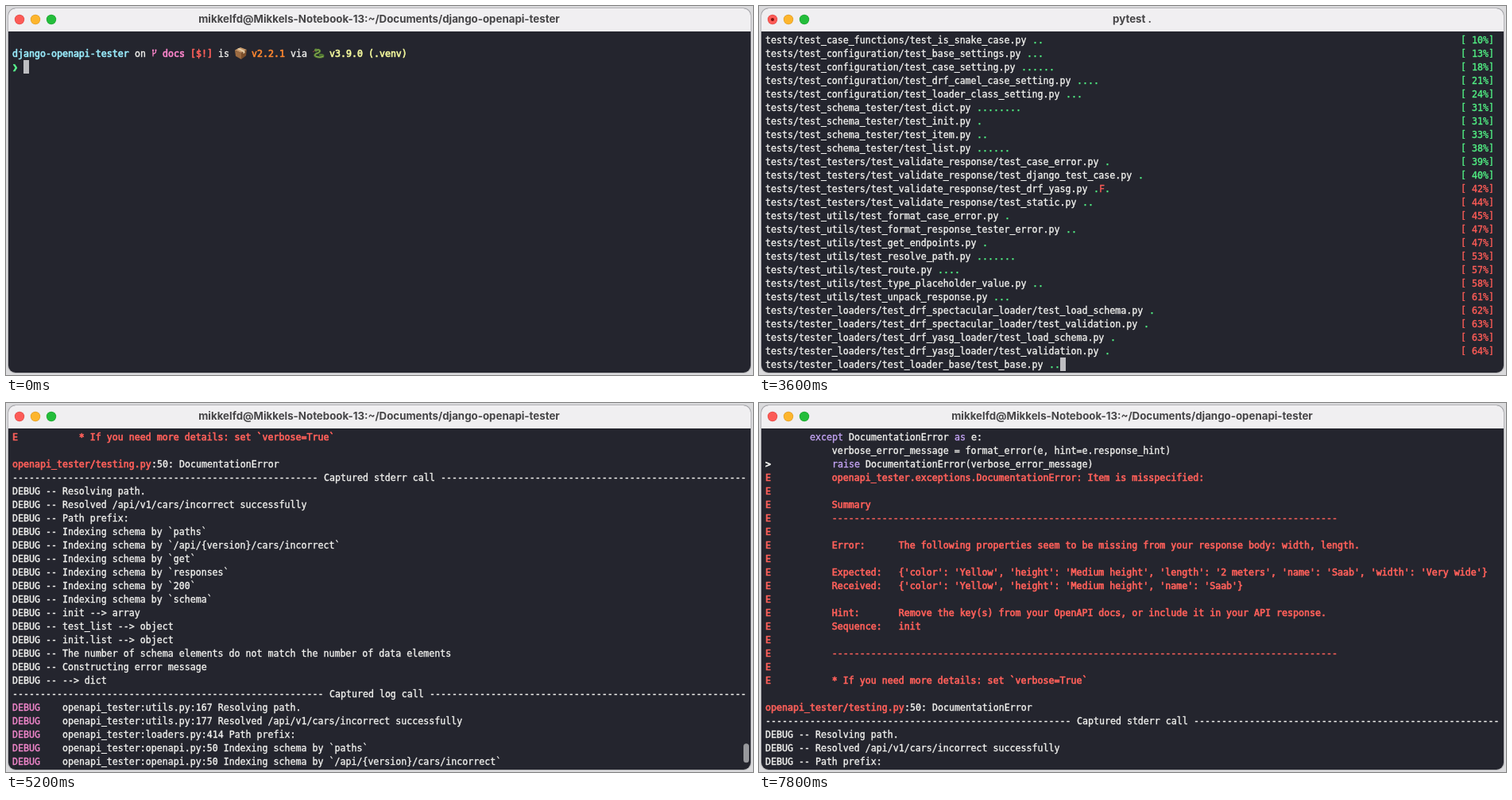
Write an HTML page with a canvas that moves like this. It is 940x464 px and loops after 8000 ms.

```html
<!DOCTYPE html>
<html lang="en">
<head>
<meta charset="utf-8">
<title>Terminal</title>
<style>
html, body { margin: 0; width: 100%; height: 100%; overflow: hidden; background: #dadadc; }
canvas { display: block; }
</style>
</head>
<body>
<canvas id="stage" width="940" height="464"></canvas>
<script>
const ctx = document.getElementById('stage').getContext('2d');
const LOOP = 8000, STEP = 200;
const COLS = 132, ROWS = 25, CW = 7, RH = 17, LEFT = 8, TOP = 34;
const MONO = '11.627px "DejaVu Sans Mono", monospace';
const SHELL_TITLE = 'mikkelfd@Mikkels-Notebook-13:~/Documents/django-openapi-tester';

// Style key: [colour, bold]. Lines switch style with "§" and a key.
const STYLES = {
  w: ['#f1f1ee', 0], W: ['#f4f4f1', 1], u: ['#f1f1ee', 0],
  g: ['#52f285', 0], G: ['#5af78e', 1], r: ['#ff5c57', 0], R: ['#ff605a', 1],
  c: ['#9aedfe', 1], m: ['#ff86cd', 1], o: ['#ff8730', 1], y: ['#f4f99d', 1],
  p: ['#c3a3f3', 0], d: ['#f086ca', 0]
};

function parse(line) {
  let col = 0;
  return ('w' + line).split('§').filter(s => s.length > 1).map(s => {
    const part = { key: s[0], text: s.slice(1), col };
    col += part.text.length;
    return part;
  });
}
const width = line => parse(line).reduce((n, p) => n + p.text.length, 0);

function rule(title, ch, key, plain = title.length) {
  const n = Math.floor((COLS - plain - 2) / 2);
  const extra = n * 2 + plain + 2 < COLS ? 1 : 0;
  return `§${key}${ch.repeat(n)}§${key} ${title} §${key}${ch.repeat(n + extra)}`;
}

const PROMPT = '§cdjango-openapi-tester§w on   §mdocs §R[$!]§w is    §ov2.2.1§w via    §yv3.9.0 (.venv)';

const SESSION = [
  rule('test session starts', '=', 'W'),
  'platform darwin -- Python 3.9.0, pytest-6.2.1, py-1.10.0, pluggy-0.13.1',
  'django: settings: demo.settings (from ini)',
  'rootdir: /Users/mikkelfd/Documents/django-openapi-tester, configfile: pytest.ini',
  'plugins: cov-2.10.1, django-4.1.0'
];

// Folder: file and number of tests in it.
const SUITES = {
  '': 'exceptions:2 openapi:2',
  'test_case_functions/': 'ignore_case:1 is_camel_case:2 is_kebab_case:2 is_pascal_case:2 is_snake_case:2',
  'test_configuration/': 'base_settings:3 case_setting:6 drf_camel_case_setting:4 loader_class_setting:3',
  'test_schema_tester/': 'dict:8 init:1 item:2 list:6',
  'test_testers/test_validate_response/': 'case_error:1 django_test_case:1 drf_yasg:3 static:2',
  'test_utils/': 'format_case_error:1 format_response_tester_error:2 get_endpoints:1 resolve_path:7 ' +
    'route:4 type_placeholder_value:2 unpack_response:3',
  'tester_loaders/test_drf_spectacular_loader/': 'load_schema:1 validation:1',
  'tester_loaders/test_drf_yasg_loader/': 'load_schema:1 validation:1',
  'tester_loaders/test_loader_base/': 'base:4 create_dict_from_schema:4 ' +
    'get_request_body_schema_section:10 get_response_schema_section:6 validation_methods:4',
  'tester_loaders/test_static_schema_loader/': 'load_file:5 load_schema:4 validation:5'
};
const TOTAL = 119, FAILED = 50;

function testLines(done) {
  const out = [];
  let start = 0;
  for (const [dir, files] of Object.entries(SUITES)) {
    for (const file of files.split(' ')) {
      if (start >= done) return out;
      const [name, size] = file.split(':');
      const end = start + Number(size);
      const path = `tests/${dir}test_${name}.py `;
      let marks = '';
      for (let i = start + 1; i <= Math.min(end, done); i++) marks += i === FAILED ? '§rF' : '§g.';
      let line = path + marks;
      if (done > end || done === TOTAL) {
        const pct = String(Math.floor(end * 100 / TOTAL)).padStart(3);
        line += '§w' + ' '.repeat(COLS - 7 - width(line)) + (end < FAILED ? '§g' : '§r') + `[${pct}%]`;
      }
      out.push(line);
      start = end;
    }
  }
  return out;
}

const DASHES = '-'.repeat(91);
const ERRORS = [
  'openapi_tester.exceptions.DocumentationError: Item is misspecified:',
  '', 'Summary', DASHES, '',
  'Error:      The following properties seem to be missing from your response body: width, length.',
  '',
  "Expected:   {'color': 'Yellow', 'height': 'Medium height', 'length': '2 meters', 'name': 'Saab', 'width': 'Very wide'}",
  "Received:   {'color': 'Yellow', 'height': 'Medium height', 'name': 'Saab'}",
  '',
  'Hint:       Remove the key(s) from your OpenAPI docs, or include it in your API response.',
  'Sequence:   init',
  '', DASHES, '',
  '* If you need more details: set `verbose=True`'
];

const index = key => ['openapi.py:50', 'Indexing schema by `' + key + '`'];
const LOG = [
  ['utils.py:167', 'Resolving path.'],
  ['utils.py:177', 'Resolved /api/v1/cars/incorrect successfully'],
  ['loaders.py:414', 'Path prefix:'],
  ...['paths', '/api/{version}/cars/incorrect', 'get', 'responses', '200', 'schema'].map(index),
  ['testing.py:98', 'init --> array'],
  ['testing.py:75', 'test_list --> object'],
  ['testing.py:98', 'init.list --> object'],
  ['testing.py:64', 'The number of schema elements do not match the number of data elements'],
  ['testing.py:41', 'Constructing error message'],
  ['testing.py:45', '--> dict']
];

const REPORT = [
  '        §pexcept§w DocumentationError §pas§w e:',
  '            verbose_error_message = format_error(e, hint=e.response_hint)',
  '§W>§w           §praise§w DocumentationError(verbose_error_message)',
  ...ERRORS.map(s => '§RE           ' + s),
  '',
  '§Ropenapi_tester/testing.py§w:50: DocumentationError',
  rule('Captured stderr call', '-', 'w'),
  ...LOG.map(([, msg]) => 'DEBUG -- ' + msg),
  rule('Captured log call', '-', 'w'),
  ...LOG.map(([src, msg]) => `§dDEBUG§w    openapi_tester:${src} ${msg}`),
  rule('short test summary info', '=', 'c'),
  'FAILED tests/test_testers/test_validate_response/test_drf_yasg.py::test_incorrect - openapi_tester.exceptions.DocumentationError...',
  rule('§R1 failed§r, §g118 passed§r in 1.42s', '=', 'r', '1 failed, 118 passed in 1.42s'.length)
];

const TYPED = ['', 'p', 'pyt', 'pytes', 'pytest', 'pytest .'];
const SCROLL = [6, 16, 22, 27, 30, 32, 33, 34];

function commandLine(typed) {
  const [cmd, arg] = typed.split(' ');
  return '§G❯§w ' + (cmd ? (cmd === 'pytest' ? '§g' : '§R') + cmd : '') + (arg ? '§w §u' + arg : '');
}

function buffer(t) {
  const lines = ['', PROMPT, commandLine(TYPED[Math.min(t / STEP, 5)])];
  if (t < 1200) return lines;
  if (t < 2200) return [...lines, ''];
  lines.push(...SESSION);
  if (t < 2600) return [...lines, '§Wcollecting ... '];
  const done = Math.max(1, Math.min(TOTAL, Math.round(30 + (t - 3000) * 0.081)));
  lines.push('§Wcollected 119 items', '', ...testLines(done));
  if (t < 4200) return lines;
  lines.push('', ...REPORT, '');
  return t < 4400 ? lines : [...lines, PROMPT, '§R❯§w '];
}

function circle(x, y, r, color) {
  ctx.fillStyle = color;
  ctx.beginPath();
  ctx.arc(x, y, r, 0, Math.PI * 2);
  ctx.fill();
}

function light(x, color, rim) {
  circle(x, 17, 6.2, rim);
  circle(x, 17, 5.5, color);
}

function poly(color, ...pts) {
  ctx.fillStyle = color;
  ctx.beginPath();
  for (let i = 0; i < pts.length; i += 2) ctx.lineTo(pts[i], pts[i + 1]);
  ctx.fill();
}

function roundBox(x, y, w, h, r, color) {
  ctx.fillStyle = color;
  ctx.beginPath();
  ctx.roundRect(x, y, w, h, r);
  ctx.fill();
}

function curve(color, w, d) {
  ctx.strokeStyle = color;
  ctx.lineWidth = w;
  ctx.stroke(new Path2D(d));
}

function drawIcons(y) {
  ctx.save();
  ctx.lineCap = 'round';
  // branch
  ctx.translate(183, y);
  curve('#ff86cd', 1.2, 'M2 5V12M5.5 5V6.5Q5.5 8.3 2 9.5');
  circle(2, 4.6, 1.1, '#ff86cd');
  circle(5.5, 4.6, 1.1, '#ff86cd');
  // package
  ctx.translate(105, 0);
  poly('#c99a6b', 0, 4.5, 7, 1, 15, 4, 8, 8);
  poly('#9c6b41', 0, 4.5, 8, 8, 8, 16, 1, 12);
  poly('#7b4f2c', 15, 4, 8, 8, 8, 16, 14, 11.5);
  poly('#e6cfa9', 3, 3, 5, 2, 12.5, 5.5, 12.5, 8, 10.5, 9, 10.5, 6.7);
  // snake
  ctx.translate(98, 0);
  curve('#527a34', 2.6, 'M4 4.5Q9 3 9 6Q8 8 4 9Q1 11 4 12.5Q9 14.5 13 12.5Q14 10 9 10.5');
  curve('#9bb957', 0.9, 'M4 4.5Q9 3 9 6Q8 8 4 9Q1 11 4 12.5Q9 14.5 13 12.5');
  circle(4, 4.4, 2, '#668e3d');
  curve('#d9534a', 0.7, 'M2 5.5L0.5 6.5');
  ctx.restore();
}

// A thin outline thickens the strokes, more so for bold.
function drawText(text, x, y, color, bold) {
  ctx.fillStyle = ctx.strokeStyle = color;
  ctx.lineWidth = bold ? 0.65 : 0.35;
  ctx.fillText(text, x, y);
  ctx.strokeText(text, x, y);
}

function drawLine(line, row) {
  const y = TOP + row * RH;
  for (const { key, text, col } of parse(line)) {
    const [color, bold] = STYLES[key], x = LEFT + col * CW, w = text.length * CW;
    if (/^=+$/.test(text)) {
      ctx.fillStyle = color;
      ctx.fillRect(x, y + 7, w, 1.4);
      ctx.fillRect(x, y + 9.6, w, 1.4);
      continue;
    }
    drawText(text, x, y + 13, color, bold);
    if (key === 'u') ctx.fillRect(x, y + 15, w, 1);
  }
  if (line === PROMPT) drawIcons(y);
}

function drawWindow(running) {
  ctx.fillStyle = '#dadadc';
  ctx.fillRect(0, 0, 940, 464);
  roundBox(2, 2, 936, 460, 10, '#b4b4b7');
  roundBox(3, 3, 934, 458, 9, '#24252e');
  roundBox(3, 3, 934, 29, [9, 9, 0, 0], '#f0eff1');
  light(17, '#fc5b57', '#e2504b');
  light(37, '#fdb52d', '#e0a02c');
  light(57, '#24bd3b', '#22a835');
  if (running) circle(17, 17, 2, '#7c100e');
  ctx.fillStyle = '#464547';
  ctx.font = '700 13.3px Inter, sans-serif';
  ctx.textAlign = 'center';
  ctx.fillText(running ? 'pytest .' : SHELL_TITLE, 469.5, 21);
  ctx.textAlign = 'left';
}

function draw(t) {
  drawWindow(t >= 1200 && t < 4400);
  const lines = buffer(t);
  const scroll = t < 5000 ? 0 : SCROLL[Math.min((t - 5000) / STEP, SCROLL.length - 1)];
  const first = Math.max(0, lines.length - ROWS - scroll);
  ctx.font = MONO;
  ctx.lineJoin = 'round';
  lines.slice(first, first + ROWS).forEach(drawLine);

  const row = lines.length - 1 - first;
  if (row < ROWS) {
    ctx.fillStyle = '#bdbdc1';
    ctx.fillRect(LEFT + width(lines[lines.length - 1]) * CW, TOP + row * RH, CW, RH);
  }
  if (scroll && t < 7000) {
    ctx.globalAlpha = Math.min(1, (7000 - t) / 400);
    roundBox(928, 435.5 - scroll * 0.45, 7, 24, 3.5, '#97989c');
    ctx.globalAlpha = 1;
  }
}

const began = performance.now();
function tick() {
  const t = (performance.now() - began) % LOOP;
  draw(Math.floor(t / STEP) * STEP);
  requestAnimationFrame(tick);
}
tick();
</script>
</body>
</html>
```
